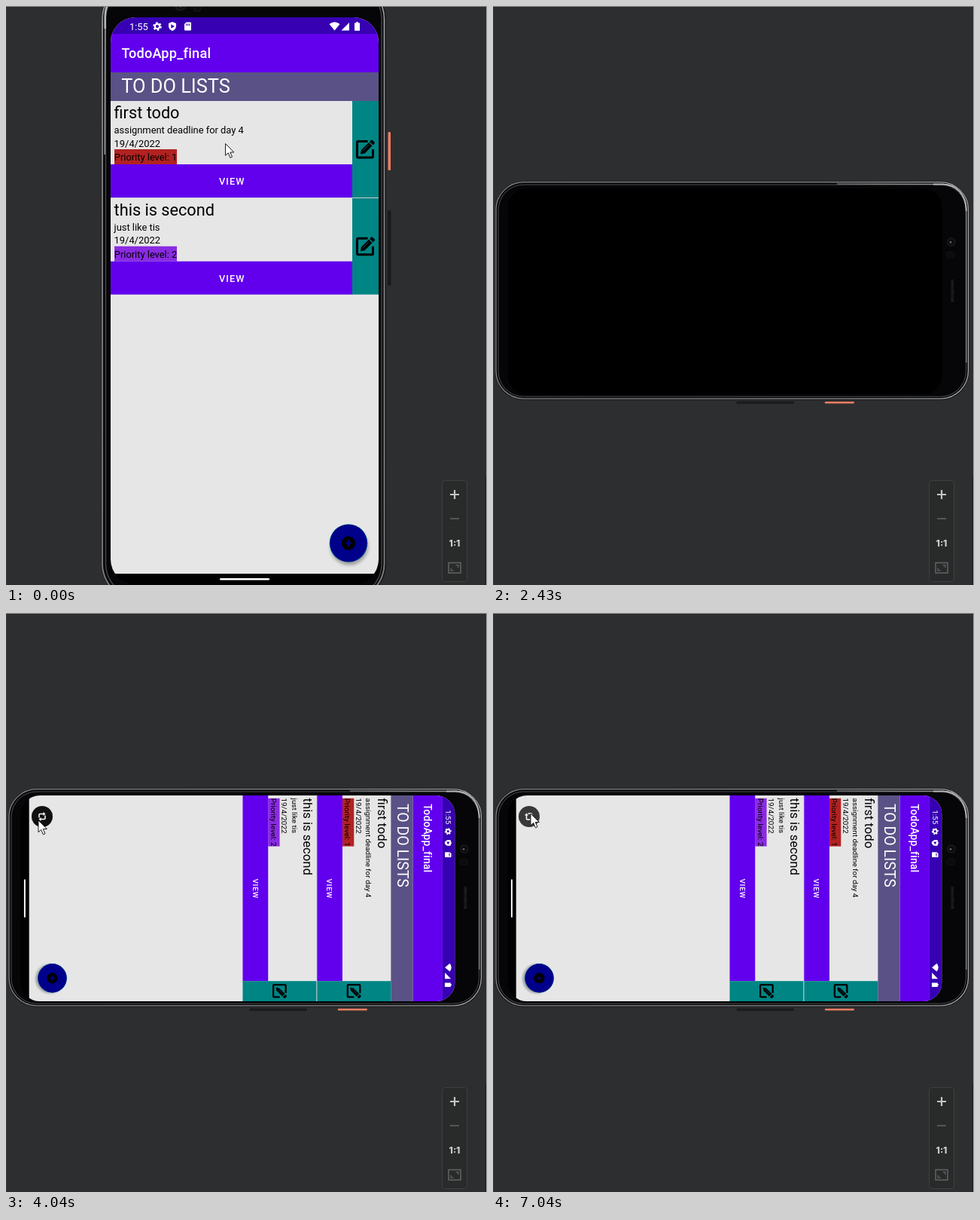
An HTML page for the animation above (8 s loop, 639 by 768 pixels).

```html
<!DOCTYPE html>
<html lang="en">
<head>
<meta charset="utf-8">
<title>Phone rotation</title>
<style>
  html, body { margin: 0; width: 100%; height: 100%; overflow: hidden; background: #2d2e30; }
  svg { display: block; width: 639px; height: 768px; }
  text { font-family: Roboto, sans-serif; font-size: 12.88px; white-space: pre; }
  .title { font-size: 18.1px; font-weight: 500; letter-spacing: .24px; }
  .head { font-size: 25.35px; }
  .big { font-size: 21.7px; }
  .view { font-size: 12.7px; font-weight: 500; letter-spacing: 1.13px; fill: #fff; }
</style>
</head>
<body>
<svg viewBox="0 0 639 768" xmlns="http://www.w3.org/2000/svg">
  <defs>
    <clipPath id="display"><rect x="139" y="15" width="356" height="752" rx="33"/></clipPath>
    <linearGradient id="rim" x1="0" y1="0" x2="0" y2="1">
      <stop offset="0" stop-color="#a4a4a6"/>
      <stop offset=".3" stop-color="#8a8a8c"/>
      <stop offset="1" stop-color="#848486"/>
    </linearGradient>
    <filter id="soft" x="-30%" y="-30%" width="160%" height="160%"><feGaussianBlur stdDeviation="2.2"/></filter>
    <g id="edit" fill="none" stroke="#000">
      <path d="M3 -10.5H-9.5Q-11 -10.5 -11 -9V9.5Q-11 11 -9.5 11H8.5Q10 11 10 9.5V0" stroke-width="3"/>
      <path d="M-6.500 6.500L-5.500 1L4.500 -9L9 -4.500L-1 5.500Z" fill="#000" stroke="none"/>
      <path d="M5.500 -10L7.500 -12Q8.500 -12.700 9.500 -12L12 -9.500Q12.600 -8.500 12 -7.500L10 -5.500Z" fill="#000" stroke="none"/>
      <path d="M-3.800 2.400L4 -5.300" stroke="#008585" stroke-width=".7"/>
    </g>
  </defs>

  <rect width="639" height="768" fill="#2d2e30"/>
  <rect width="1" height="768" fill="#3c3d3f"/>
  <rect x="636.5" y="624" width="1.5" height="144" fill="#202123"/>
  <rect x="638" width="1" height="768" fill="#a2a3a4"/>

  <g id="phone">
    <rect x="125.2" y="119" width="2" height="81" rx="1" fill="#303133"/>
    <rect x="507" y="271" width="4.5" height="100" rx="1.5" fill="#1a1b1c"/>
    <rect x="507.5" y="167" width="3.5" height="51" rx="1.5" fill="#ef7d63"/>
    <rect x="126.5" y="-32" width="378.5" height="821" rx="49" fill="#18191a"/>
    <rect x="128" y="-30.5" width="374.5" height="818" rx="48" fill="#0a0a0c" stroke="url(#rim)" stroke-width="1.7"/>
    <rect x="132.5" y="-26.5" width="366.5" height="810" rx="44" fill="#060608" stroke="#4b4c4e" stroke-width="1.3"/>
    <path d="M131.2 197L131.7 14C132 -10 150 -27 178 -27H440" fill="none" stroke="#98999b" stroke-width="1.5"/>
    <path d="M131.700 30V14C132 -10 150 -27 178 -27" fill="none" stroke="#b4b5b7" stroke-width="2.600"/>
    <circle cx="231.500" cy="-1" r="8" fill="#151518"/>
    <circle cx="231.500" cy="-1" r="4.500" fill="#0a0a0c"/>
    <circle cx="232" cy="0" r="1.800" fill="#626366"/>
    <rect x="249" y="-7" width="10" height="14" rx="4" fill="#0b0b0d" stroke="#19191c"/>
    <path d="M297 -3H336" stroke="#2c2d2f" stroke-width="5" stroke-dasharray="1.500 1.500"/>
    <rect x="139" y="15" width="356" height="752" rx="33" fill="#000"/>

    <g id="app" clip-path="url(#display)">
      <rect x="139" y="15" width="356" height="738" fill="#e7e6e6"/>
      <rect x="139" y="15" width="356" height="22.500" fill="#3700b3"/>
      <rect x="139" y="37" width="356" height="51" fill="#6200ee"/>
      <rect x="139" y="88" width="356" height="38" fill="#5a5286"/>
      <g fill="#fff">
        <text x="164" y="31.600">1:55</text>
        <circle cx="201" cy="27" r="3.200" fill="none" stroke="#fff" stroke-width="2.300"/>
        <circle cx="201" cy="27" r="4.900" fill="none" stroke="#fff" stroke-width="1.800" stroke-dasharray="2.600 2.530"/>
        <path d="M221 21L226 23V27Q225.500 31.500 221 33Q216.500 31.500 216 27V23Z"/>
        <path d="M219.300 24.300L224 27L219.300 29.700Z" fill="#3700b3"/>
        <path d="M239.500 21.500H245Q246 21.500 246 22.500V31.500Q246 32.500 245 32.500H238Q237 32.500 237 31.500V24Z"/>
        <path d="M239.500 23.500V26M241.500 23.500V26M243.500 23.500V26" stroke="#3700b3"/>
        <path d="M429.500 24Q436.500 18.500 443.500 24L436.500 32.500Z"/>
        <path d="M445.500 32.500H456V22Z"/>
        <path d="M463 22.500H465V21.300H468V22.500H470V32.700H463Z"/>
        <text class="title" x="153.500" y="69.400">TodoApp_final</text>
        <text class="head" x="153.300" y="114.800">TO DO LISTS</text>
      </g>
      <g id="items"></g>
      <rect x="139" y="254" width="356" height="1" fill="#c9cdcf"/>
      <ellipse cx="456" cy="717" rx="25" ry="24.500" fill="#000" opacity=".32" filter="url(#soft)"/>
      <circle cx="455" cy="712.500" r="25.300" fill="#067f93"/>
      <circle cx="455" cy="712.500" r="24.800" fill="#00008b"/>
      <circle cx="455" cy="712.500" r="9.200" fill="#000"/>
      <path d="M450.500 712.500H459.500M455 708V717" stroke="#00008b" stroke-width="1.800"/>
      <rect x="139" y="753" width="356" height="14" fill="#000"/>
      <rect x="284" y="759" width="66" height="2.500" rx="1.200" fill="#fff"/>
    </g>
  </g>

  <g id="hint" transform="translate(48 270)">
    <circle id="disc" r="14"/>
    <g id="glyph" fill="none" stroke="#fff" stroke-width="1.500">
      <path d="M-4 1.500V-2.500Q-4 -3.500 -3 -3.500H3M4 -1.500V2.500Q4 3.500 3 3.500H-3"/>
      <path d="M1.500 -6L4.500 -3.500L1.500 -1ZM-1.500 6L-4.500 3.500L-1.500 1Z" fill="#fff" stroke="none"/>
    </g>
  </g>

  <g>
    <rect x="579.500" y="629.500" width="33" height="134" rx="3.500" fill="#292a2a" stroke="#3e3f41"/>
    <path d="M590 648H602M596 642V654" stroke="#c3c4c5" stroke-width="2.200"/>
    <path d="M590 680H602" stroke="#545557" stroke-width="2"/>
    <text x="596" y="717.300" text-anchor="middle" fill="#cfd0d1" style="font:800 12px Inter,sans-serif">1:1</text>
    <rect x="588" y="738.500" width="16" height="13.500" fill="none" stroke="#626365" stroke-width="1.500"/>
    <path d="M597.500 741.700H600.800V745M591.200 745.500V748.800H594.500" fill="none" stroke="#626365" stroke-width="1.300"/>
  </g>

  <rect width="639" height="1" fill="#8e8f91"/>
  <path id="cursor" d="M.5 .5V16.300L4.200 12.900L6.900 19.300L9.500 18.200L6.800 12H11.900Z" fill="#fff" stroke="#1c1c1c" stroke-width="1"/>
</svg>

<script>
const $ = id => document.getElementById(id);
const LOOP = 8000, TURN = 2430, LIT = 2850;

const item = (dy, title, note, level, color) => `
  <g transform="translate(0 ${dy})">
    <text class="big" x="143.600" y="149.300">${title}</text>
    <text x="143.600" y="169">${note}</text>
    <text x="143.600" y="186.600">19/4/2022</text>
    <rect x="144" y="190" width="83" height="20" fill="${color}"/>
    <text x="143.800" y="205.400">Priority level: ${level}</text>
    <rect x="139" y="210" width="321" height="44" fill="#6200ee"/>
    <rect x="460" y="126" width="35" height="128" fill="#008585"/>
    <text class="view" x="283" y="236.900">VIEW</text>
    <use href="#edit" x="477.500" y="190"/>
  </g>`;
$('items').innerHTML =
  item(0, 'first todo', 'assignment deadline for day 4', 1, '#b22222') +
  item(128.7, 'this is second', 'just like tis', 2, '#8a2be2');

// [time, x, y]; no position means hidden
const cursorSteps = [
  [0, 291, 182], [430, 310, 157], [550, 312, 100], [670, 303, 40], [790, 289, -18.6], [940],
  [3410, 79, 187], [3530, 69, 214], [3650, 58, 242], [3770, 48, 263], [3890, 43, 271],
  [4040, 42.5, 274.5], [6900, 47.5, 267], [7040, 49.5, 265.5]
];
// [time, opacity, gray level, icon angle]
const hintSteps = [
  [0, 0, 16, 0], [3000, .35, 16, 0], [3140, .75, 16, 0], [3260, 1, 16, 0],
  [5460, 1, 32, 45], [5710, 1, 38, 90], [5990, 1, 46, 45], [6520, 1, 56, 90]
];
const at = (steps, t) => steps.filter(s => s[0] <= t).pop();

function draw(now) {
  const t = now % LOOP;
  $('phone').setAttribute('transform', t < TURN ? '' : 'matrix(0 .767 -.767 0 608 135.4)');
  $('app').style.display = t >= TURN && t < LIT ? 'none' : '';

  const [, x, y] = at(cursorSteps, t);
  $('cursor').style.display = x === undefined ? 'none' : '';
  if (x !== undefined) $('cursor').setAttribute('transform', `translate(${x} ${y})`);

  const [, alpha, gray, angle] = at(hintSteps, t);
  $('hint').setAttribute('opacity', alpha);
  $('disc').setAttribute('fill', `rgb(${gray},${gray},${gray})`);
  $('glyph').setAttribute('transform', `rotate(${angle})`);
}

const start = performance.now();
function tick() {
  draw(performance.now() - start);
  requestAnimationFrame(tick);
}
tick();
</script>
</body>
</html>
```
